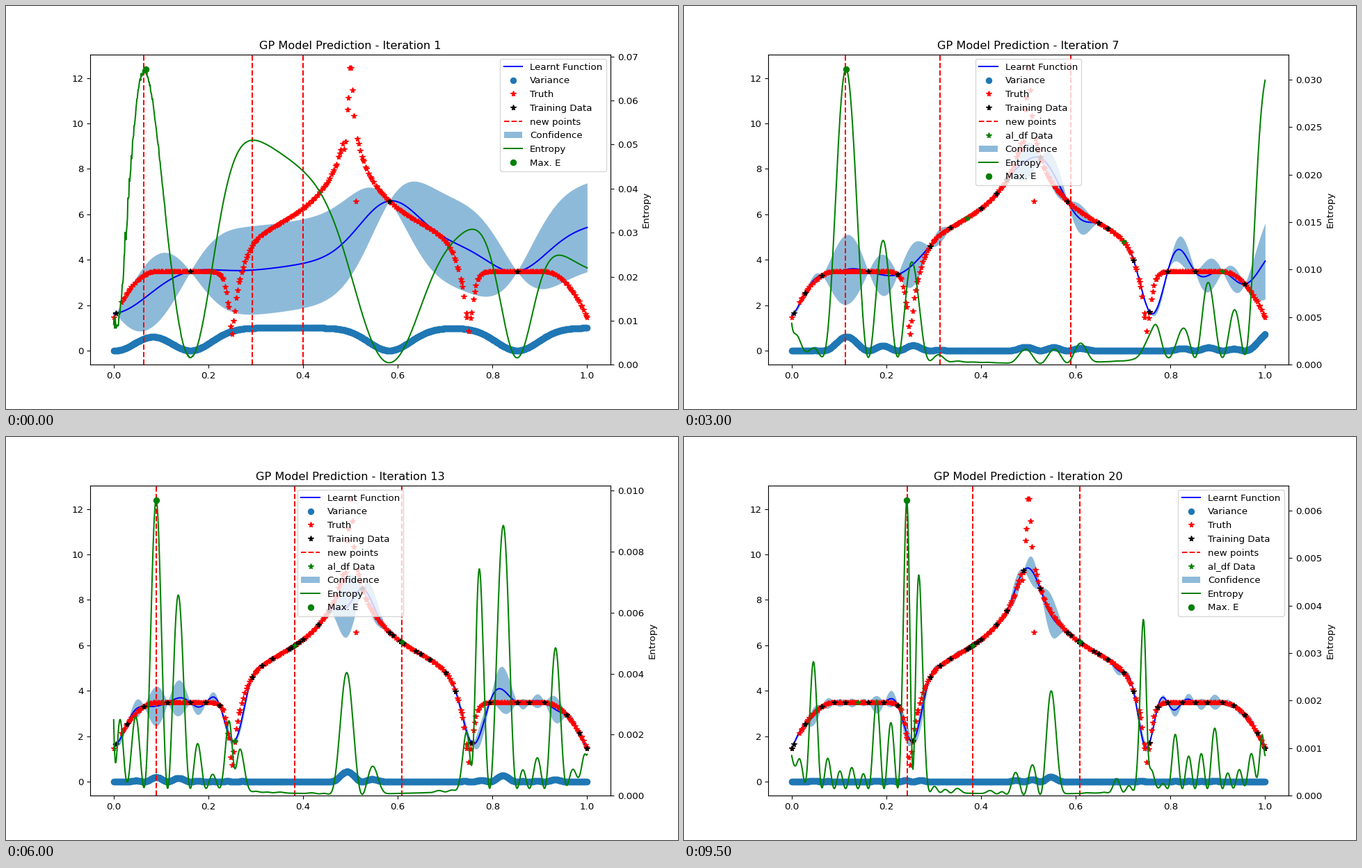
Animation, 966 px wide and 580 px high, one loop 10000 ms. Source, as a matplotlib script:

```python
import numpy as np
import matplotlib.pyplot as plt
from matplotlib.animation import FuncAnimation

plt.rcParams["font.family"] = "DejaVu Sans"

START = [.004, .162, .582, .852]
EARLY_PICKS = [
    (.064, .292, .400), (.224, .433, .668), (.525, .756, .957), (.028, .454, .722),
    (.336, .648, .794), (.370, .701, .910), (.114, .314, .590), (.393, .638, 1.0),
    (.380, .605, .983), (.195, .375, .605), (.385, .611, .878),
]
# Later searches settle on the same pair and add a single fresh point.
SETTLED = (.382, .608)
PROBES = [.256, .090, .490, .825, .933, 0, .773, .140, .2435]
PICKS = EARLY_PICKS + [SETTLED + (probe,) for probe in PROBES]

ENTROPY_TOP = [.0705, .036, .0249, .031, .028, .03, .03266, .029, .0235, .012,
               .00441, .0044, .01017, .0098, .0085, .0043, .00291, .0037, .0068, .00653]
GRID = np.linspace(0, 1, 1000)


def bump(x, centre, width):
    return np.exp(-((x - centre) / width) ** 2)


def truth(x):
    """Symmetric response: central pole, a dip on each side, falling edges."""
    u = np.clip(abs(x - .5), .0021, None)
    to_dip = abs(u - .25)
    slope = 2.586 - 1.6 * np.log(u) - 4.1 * np.exp(-to_dip / .02)
    edge = 2.02 * np.clip(1 - (.5 - u) / .09, 0, None) ** 2
    plateau = 3.48 - 2.8 * np.exp(-(to_dip / .011) ** 1.3) - edge
    glitch = 3.8 * bump(x, .5107, .0016) + .85 * bump(x, .4885, .003)
    return np.where(u < .25, slope - glitch, plateau)


def truth_positions(count=330):
    jitter = np.random.default_rng(4).random(count)
    x = (np.arange(count) + jitter) / count
    return np.concatenate([[0], x[x > .014], [1]])


def kernel_length(iteration):
    return np.interp(iteration, [1, 3, 7, 11, 13, 17, 20],
                     [.063, .073, .036, .038, .028, .031, .024])


def gaussian_process(x, length):
    """Kriging with a linear trend: mean and variance on the grid."""
    def kernel(a, b):
        return np.exp(-0.5 * ((a[:, None] - b) / length) ** 2)

    def trend(a):
        return np.column_stack([np.ones_like(a), a])

    y = truth(x)
    inverse = np.linalg.inv(kernel(x, x) + 1e-4 * np.eye(len(x)))
    basis = trend(x)
    beta = np.linalg.solve(basis.T @ inverse @ basis, basis.T @ inverse @ y)
    cross = kernel(GRID, x)
    mean = trend(GRID) @ beta + cross @ inverse @ (y - basis @ beta)
    variance = 1 - np.sum(cross @ inverse * cross, axis=1)
    return mean, np.clip(variance, 0, 1)


def relative_entropy(mean, variance, length, seed):
    """Variance relative to the squared mean, scaled to a peak of one."""
    inverse_square = 1 / np.maximum(mean, 1) ** 2
    curve = variance * inverse_square
    curve = curve / curve.max() + .3 * inverse_square
    if length > .06:  # wide kernels are badly conditioned near the left edge
        noise = np.random.default_rng(seed).normal(0, 1, GRID.size)
        curve += (length - .055) * 6 * abs(noise) * np.exp(-GRID / .05)
    return curve / curve.max()


TRUE_X = truth_positions()
fig = plt.figure(figsize=(10, 580 / 96.6), dpi=96.6)


def draw(frame):
    iteration = frame + 1
    older = np.array(START + [p for picks in PICKS[:max(frame - 1, 0)] for p in picks])
    latest = np.array(PICKS[frame - 1] if frame else [])
    length = kernel_length(iteration)
    mean, variance = gaussian_process(np.unique(np.append(older, latest)), length)
    spread = 1.96 * np.sqrt(variance)

    fig.clf()
    ax = fig.add_subplot()
    ax.plot(GRID, mean, "b-", label="Learnt Function")
    ax.plot(GRID, variance, "o", color="C0", label="Variance")
    ax.plot(TRUE_X, truth(TRUE_X), "r*", label="Truth")
    ax.plot(older, truth(older), "k*", label="Training Data")
    for n, pick in enumerate(PICKS[frame]):
        ax.axvline(pick, color="r", ls="--", label="_" if n else "new points")
    if frame:
        ax.plot(latest, truth(latest), "g*", label="al_df Data")
    ax.fill_between(GRID, mean - spread, mean + spread, color="C0", alpha=.5, lw=0,
                    label="Confidence")
    ax.set(xlim=(-.05, 1.05), ylim=(-.621, 13.04),
           title=f"GP Model Prediction - Iteration {iteration}")

    top = ENTROPY_TOP[frame]
    entropy = relative_entropy(mean, variance, length, iteration) * top / 1.05
    peak = entropy.argmax()
    twin = ax.twinx()
    twin.plot(GRID, entropy, "g-", label="Entropy")
    twin.plot(GRID[peak], entropy[peak], "go", label="Max. E")
    twin.set(ylim=(0, top), ylabel="Entropy")
    handles, labels = ax.get_legend_handles_labels()
    more_handles, more_labels = twin.get_legend_handles_labels()
    twin.legend(handles + more_handles, labels + more_labels, loc="best")
    return []


anim = FuncAnimation(fig, draw, frames=20, interval=500, repeat=True, repeat_delay=0)
plt.show()
```
